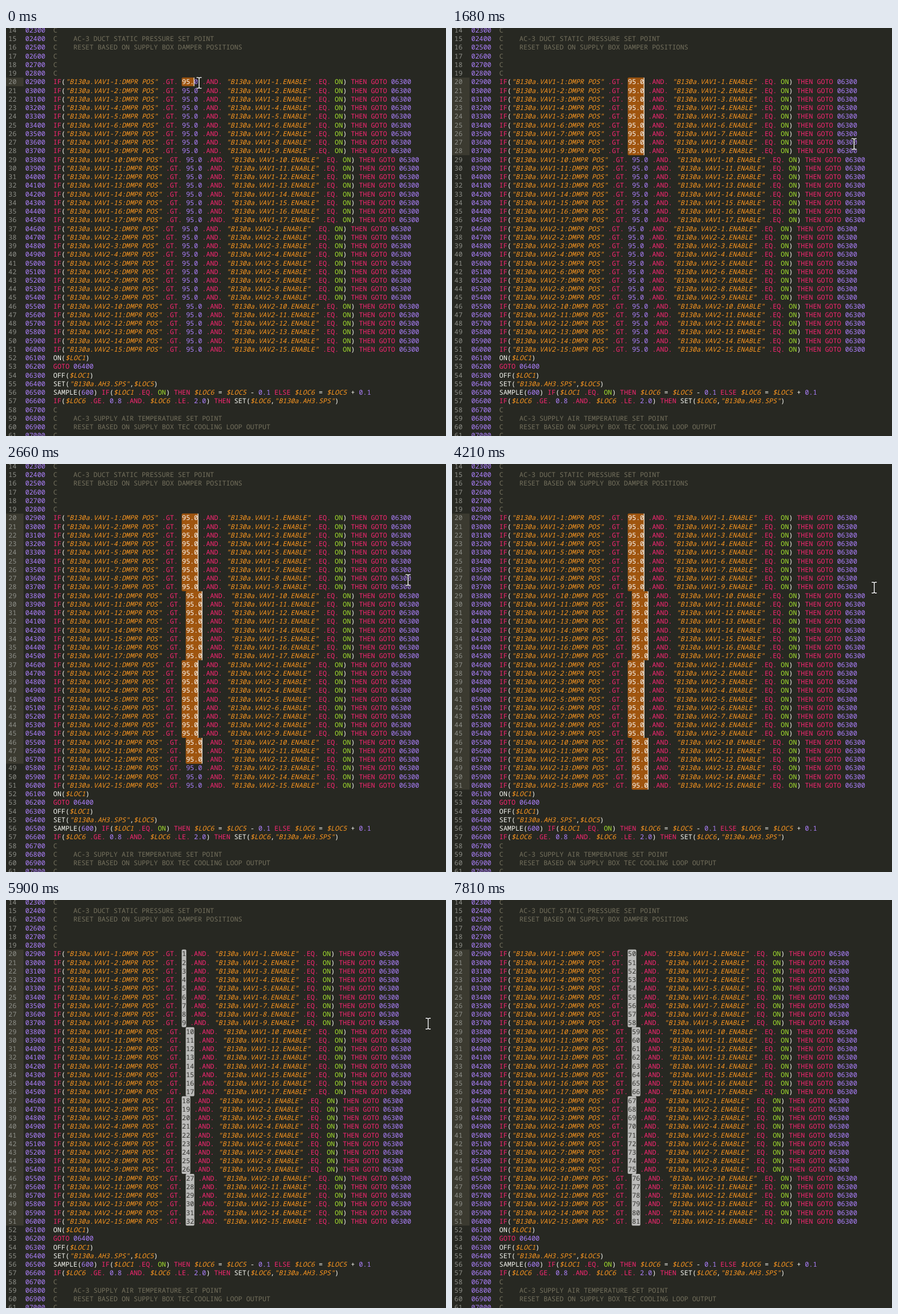
An HTML page that plays this animation: 777 by 721 pixels, repeating every 8000 ms.

```html
<!DOCTYPE html>
<html lang="en">
<head>
<meta charset="utf-8">
<title>Editing numbers with multiple cursors</title>
<style>
  html, body { margin: 0; width: 100%; height: 100%; overflow: hidden; background: #272822; }
  svg { display: block; }
  text {
    font: 500 11.83px "Noto Sans Mono", "DejaVu Sans Mono", monospace;
    text-rendering: geometricPrecision;
    white-space: pre;
    fill: #f8f8f2;
  }
  .gutter { fill: #8f908a; }
  .num { fill: #ae81ff; }
  .key { fill: #f92672; }
  .on { fill: #a6e22e; }
  .str { fill: #fd971f; font-style: italic; }
  .note { fill: #75715e; }
  .picked { fill: #fff; }
  .blurred { fill: #30302c; }
  .lit { fill: #3b3a30; }
  .pick-box { fill: #9f550f; }
  .blur-box { fill: #bcbcba; }
  .caret { fill: #f8f8f0; }
  #mouse { fill: none; stroke: #fff; stroke-width: 1.5; }
  #mouse .edge { stroke: #000; stroke-opacity: .6; stroke-width: 3; }
</style>
</head>
<body>
<svg width="777" height="721" viewBox="0 0 777 721">
  <defs>
    <path id="beam" d="M-4.5 -9.5H-1.5L0 -8.5L1.5 -9.5H4.5M0 -8.5V8.5M-4.5 9.5H-1.5L0 8.5L1.5 9.5H4.5"/>
  </defs>
  <g id="marks"></g>
  <g id="fixed"></g>
  <g id="edited"></g>
  <g id="carets"></g>
  <g id="mouse"><use href="#beam" class="edge"/><use href="#beam"/></g>
</svg>
<script>
const LOOP = 8000, TICK = 139.5, BLINK = 485;
const LAST_PICK = 3200, BLUR_AT = 5900, MOUSE_GONE = 6870, TYPE_5 = 7690, TYPE_0 = 7810;
const ADVANCE = 7.1, PITCH = 15.243, CODE_X = 83.6, FIRST = 20, COUNT = 32;

// Key points: time, then the values reached there.
const PICKS = [[1140, 1], [1680, 9], [2230, 25], [2370, 28], [2511, 28], [3000, 31], [LAST_PICK, COUNT]];
const MOUSE = [[150, 341, 97], [1410, 710, 205], [3340, 710, 205], [3900, 752, 218], [4210, 745.5, 218.5]];

const HEAD = ['C', 'C    AC-3 DUCT STATIC PRESSURE SET POINT',
  'C    RESET BASED ON SUPPLY BOX DAMPER POSITIONS', 'C', 'C', 'C'];
const TAIL = ['ON($LOC1)', 'GOTO 06400', 'OFF($LOC1)', 'SET("B130a.AH3.SPS",$LOC5)',
  'SAMPLE(600) IF($LOC1 .EQ. ON) THEN $LOC6 = $LOC5 - 0.1 ELSE $LOC6 = $LOC5 + 0.1',
  'IF($LOC6 .GE. 0.8 .AND. $LOC6 .LE. 2.0) THEN SET($LOC6,"B130a.AH3.SPS")',
  'C', 'C    AC-3 SUPPLY AIR TEMPERATURE SET POINT',
  'C    RESET BASED ON SUPPLY BOX TEC COOLING LOOP OUTPUT', 'C'];

const TOKEN = /(?<str>"[^"]*"|\$\w+)|(?<key>\.(?:GT|AND|EQ|GE|LE)\.|\b(?:IF|THEN|GOTO|ELSE)\b)|(?<on>\bON(?=\)))|(?<num>\d+(?:\.\d+)?)|\w+|\s+|./g;

const el = id => document.getElementById(id);
const rowTop = line => 87.6 + (line - FIRST) * PITCH;
const colX = col => CODE_X + col * ADVANCE;
const linear = u => u;
const smooth = u => u * u * (3 - 2 * u);

function along(points, t, ease) {
  const next = points.findIndex(p => p[0] > t);
  if (next < 1) return points.at(next).slice(1);
  const [from, to] = [points[next - 1], points[next]];
  const u = ease((t - from[0]) / (to[0] - from[0]));
  return from.slice(1).map((v, i) => v + (to[i + 1] - v) * u);
}

function add(parent, tag, attrs, text) {
  const node = document.createElementNS('http://www.w3.org/2000/svg', tag);
  for (const name in attrs) node.setAttribute(name, attrs[name]);
  if (text) node.textContent = text;
  parent.append(node);
  return node;
}

const rect = (parent, cls, x, y, width, height, rx = 0) =>
  add(parent, 'rect', { class: cls, x, y, width, height, rx });

const show = (node, on) => node.setAttribute('visibility', on ? 'visible' : 'hidden');

function tokens(code) {
  if (/^C( |$)/.test(code)) return [[code, 'note']];
  return [...code.matchAll(TOKEN)].map(m =>
    [m[0], Object.keys(m.groups).find(name => m.groups[name]) || '']);
}

function write(parent, line, parts, x = CODE_X) {
  const row = add(parent, 'text', { y: rowTop(line) + 11.8 });
  for (const [text, cls] of parts) {
    if (text.trim()) add(row, 'tspan', { x, class: cls }, text);
    x += text.length * ADVANCE;
  }
}

const rules = Array.from({ length: COUNT }, (_, i) => {
  const box = i < 17 ? `B130a.VAV1-${i + 1}` : `B130a.VAV2-${i - 16}`;
  const before = `IF("${box}:DMPR POS" .GT. `;
  return {
    col: before.length,
    before: tokens(before),
    after: tokens(` .AND. "${box}.ENABLE" .EQ. ON) THEN GOTO 06300`)
  };
});

const top0 = FIRST - HEAD.length, end = FIRST + COUNT + TAIL.length;
for (let line = top0; line < end; line++) {
  write(el('fixed'), line, [[String(line), 'gutter']], 4.3);
  write(el('fixed'), line, [[String((line + 9) * 100).padStart(5, '0'), 'num']], colX(-7));
}
HEAD.forEach((code, i) => write(el('fixed'), top0 + i, tokens(code)));
TAIL.forEach((code, i) => write(el('fixed'), FIRST + COUNT + i, tokens(code)));

// A start of 0 keeps the old constant; otherwise the rows count up from it.
function drawRules(picked, start, length) {
  for (const id of ['marks', 'edited', 'carets']) el(id).replaceChildren();
  rect(el('marks'), 'lit', 0, rowTop(FIRST), 31, picked * PITCH);
  const boxes = [];
  rules.forEach((rule, i) => {
    const value = start ? String(start + i) : '95.0';
    const size = i < picked ? Math.min(length, value.length) : 0;
    write(el('edited'), FIRST + i, [...rule.before,
      [value.slice(0, size), start ? 'blurred' : 'picked'],
      [value.slice(size), 'num'], ...rule.after]);
    if (!size) return;
    const last = boxes.at(-1);
    if (last && last.col === rule.col && last.size === size) last.rows++;
    else boxes.push({ col: rule.col, size, i, rows: 1 });
    if (!start) rect(el('carets'), 'caret', colX(rule.col + size) - 0.7, rowTop(FIRST + i), 1.2, PITCH);
  });
  for (const { col, size, i, rows } of boxes)
    rect(el('marks'), start ? 'blur-box' : 'pick-box', colX(col) - 0.5, rowTop(FIRST + i),
      size * ADVANCE + 1, rows * PITCH, 2);
}

const sequenceStart = t => t < BLUR_AT ? 0 : t < TYPE_5 ? 1 : t < TYPE_0 ? 5 : 50;

let shown = '';
function render(t) {
  const held = Math.floor(t / TICK) * TICK;
  const picked = Math.round(along(PICKS, held, linear)[0]);
  const state = [picked, sequenceStart(t), t < 150 ? 3 : 4];
  if (state.join() !== shown) {
    shown = state.join();
    drawRules(...state);
  }
  show(el('carets'), Math.floor(Math.max(0, t - LAST_PICK) / BLINK) % 2 === 0);
  show(el('mouse'), t < MOUSE_GONE);
  el('mouse').setAttribute('transform', `translate(${along(MOUSE, held, smooth)})`);
}

const began = performance.now();
function tick() {
  render((performance.now() - began) % LOOP);
  requestAnimationFrame(tick);
}
tick();
</script>
</body>
</html>
```
